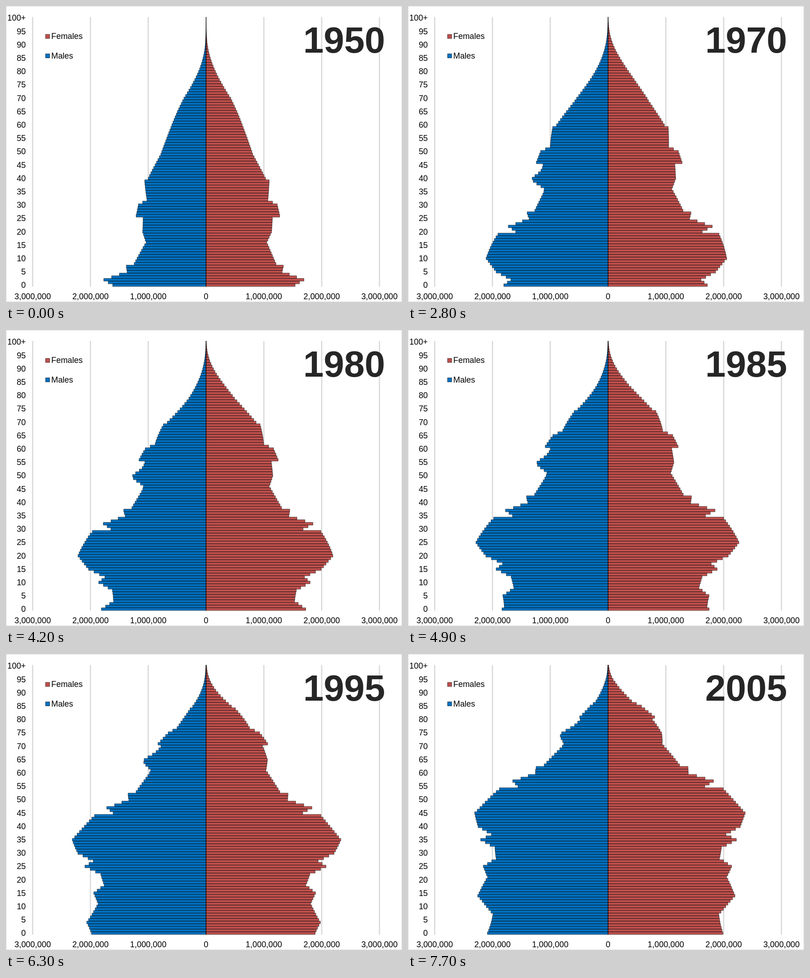
An HTML page for the animation above (8 s loop, 866x647 px).

```html
<!DOCTYPE html>
<html lang="en">
<head>
<meta charset="utf-8">
<title>Population pyramid</title>
<style>
  html, body { margin: 0; width: 100%; height: 100%; overflow: hidden; background: #fff; }
  svg { display: block; width: 866px; height: 647px; font: 17.9px "Liberation Sans", Arial, sans-serif; }
  .grid line { stroke: #d9d9d9; stroke-width: 2.6; }
  .outlined { stroke: #101010; stroke-opacity: .66; stroke-width: 1; }
  .male { fill: #0070c0; }
  .female { fill: #c0504d; }
  #year { font-size: 80.5px; font-weight: bold; fill: #262626; text-anchor: middle; }
</style>
</head>
<body>
<svg viewBox="0 0 866 647">
  <rect x=".5" y=".5" width="865" height="646" fill="#fff" stroke="#d9d9d9"/>
  <g class="grid" id="grid"></g>
  <path class="male outlined" id="males"/>
  <path class="female outlined" id="females"/>
  <path d="M437.5 24V613.5" stroke="#000" stroke-width="1.3"/>
  <g id="axis"></g>
  <rect class="female outlined" x="86.5" y="62" width="9" height="9"/>
  <text x="99" y="72.3">Females</text>
  <rect class="male outlined" x="86.5" y="104.5" width="9" height="9"/>
  <text x="99" y="114.8">Males</text>
  <text id="year" x="739.5" y="102"></text>
</svg>
<script>
const LOOP = 8000, STEP = 700, FIRST_YEAR = 1950, YEARS_PER_STEP = 5;
const CENTER = 437.5, MILLION = 126.4, BOTTOM = 613, ROW = 5.83;

// Turning points of the birth rate: [year of birth, peak cohort width in pixels].
const births = [
  [1840, 4], [1860, 22], [1885, 75], [1901, 104], [1910, 131], [1911, 139],
  [1918, 136], [1920, 157], [1924, 164], [1925, 148], [1930, 149], [1934, 140],
  [1942, 166], [1943, 184], [1945, 182], [1948, 235], [1950, 214], [1951, 254],
  [1960, 296], [1965, 284], [1968, 253], [1970, 275], [1973, 244], [1977, 244],
  [1980, 276], [1984, 274], [1991, 314], [1998, 293], [2005, 318]
];

const clamp = (v, lo = 0, hi = 1) => Math.min(hi, Math.max(lo, v));
const bump = (x, mid, spread) => Math.exp(-(((x - mid) / spread) ** 2));
const logistic = x => 1 / (1 + Math.exp(-x));

function cohortSize(born) {
  const i = Math.max(1, births.findIndex(([year]) => year >= born));
  const [[y0, a], [y1, b]] = births.slice(i - 1, i + 1);
  return Math.max(0, a + (b - a) * (born - y0) / (y1 - y0));
}

// Gompertz mortality, with longer lives in later years.
function survival(age, year) {
  const longevity = 1 + (year - 1988) * .0005 * Math.max(0, age - 70);
  return Math.exp(-.18 * Math.exp((age - 70) * .108)) * longevity;
}

// Cohorts keep growing through migration until their mid thirties.
function migration(age, year) {
  const missing = clamp(.09 + .006 * (year - age - 1950), .09, .21);
  const arriving = (1 + Math.cos(Math.PI * clamp(age / 36))) / 2;
  const lateWave = .0025 * Math.max(0, year - 1995) * clamp(age / 10);
  return 1 - missing * arriving + lateWave;
}

const femaleWidth = (age, year) =>
  cohortSize(year - age) * survival(age, year) * migration(age, year);

function maleWidth(age, year) {
  const born = year - age, since = year - 1975;
  const decline = 74.5 + (since < 0 ? -.54 : .1) * since;
  const ratio = 1.05 - .0016 * age
    - .5 * logistic((age - decline) / 7)
    - .06 * bump(age, 25, 12) * clamp((1985 - year) / 30)
    + .15 * bump(born, 1930.5, 2.6) * clamp((year - 1950) / 10)
    - .03 * bump(born, 1947.5, 2.5) * clamp((age - 15) / 5);
  return femaleWidth(age, year) * ratio;
}

function bars(width, side, year) {
  let d = "";
  for (let age = 0; age <= 100; age++) {
    const y = BOTTOM - (age + 1) * ROW;
    const x = CENTER + side * width(age, year);
    d += `M${CENTER} ${y.toFixed(2)}H${x.toFixed(1)}v${ROW}H${CENTER}z`;
  }
  return d;
}

const byId = id => document.getElementById(id);
const label = (x, y, anchor, text) =>
  `<text x="${x}" y="${y}" text-anchor="${anchor}">${text}</text>`;

let axis = "", grid = "";
for (let m = -3; m <= 3; m++) {
  const x = CENTER + m * MILLION;
  if (m) grid += `<line x1="${x}" x2="${x}" y1="24" y2="613.5"/>`;
  axis += label(x, 640.6, "middle", (Math.abs(m) * 1e6).toLocaleString("en-US"));
}
for (let age = 0; age <= 100; age += 5)
  axis += label(43.3, 616.4 - age * 5.84, "end", age === 100 ? "100+" : age);
byId("grid").innerHTML = grid;
byId("axis").innerHTML = axis;

let shown;
function draw(time) {
  const year = FIRST_YEAR + YEARS_PER_STEP * Math.floor((time % LOOP) / STEP);
  if (year === shown) return;
  shown = year;
  byId("year").textContent = year;
  byId("males").setAttribute("d", bars(maleWidth, -1, year));
  byId("females").setAttribute("d", bars(femaleWidth, 1, year));
}

const start = performance.now();
function tick() {
  draw(performance.now() - start);
  requestAnimationFrame(tick);
}
tick();
</script>
</body>
</html>
```
